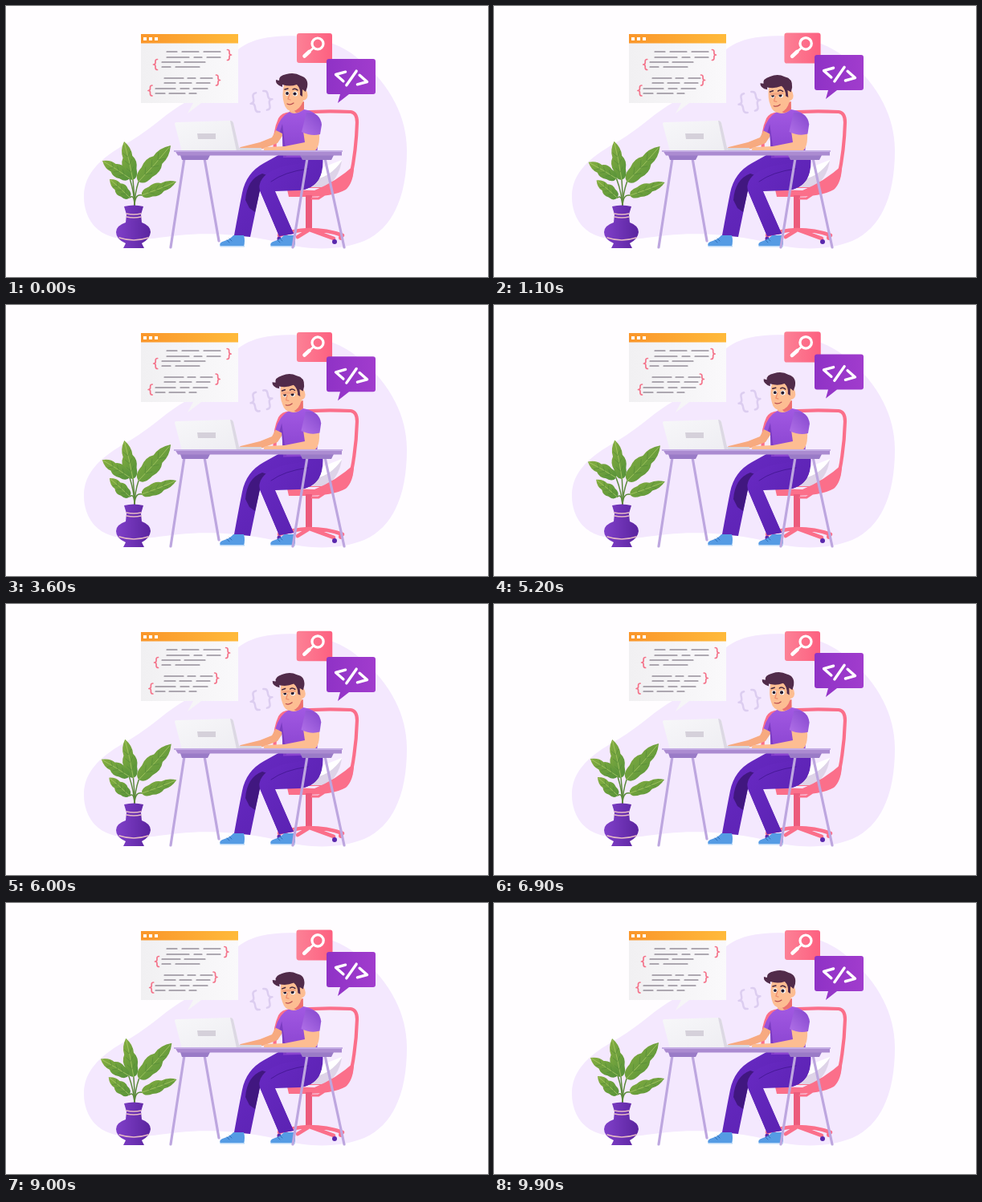
Write an HTML page that moves like this. It is 600 px wide and 338 px high and loops after 10000 ms.

```html
<!DOCTYPE html>
<html lang="en">
<head>
<meta charset="utf-8">
<title>Coding at a desk</title>
<style>
html, body { margin: 0; width: 100%; height: 100%; overflow: hidden; background: #fffdff; }
svg { display: block; width: 100vw; height: 100vh; }
.line { fill: none; stroke-linecap: round; stroke-linejoin: round; }
</style>
</head>
<body>
<svg viewBox="0 0 600 338" preserveAspectRatio="xMidYMid meet">
<defs>
  <linearGradient id="orange"><stop stop-color="#fa962b"/><stop offset="1" stop-color="#ffba3b"/></linearGradient>
  <linearGradient id="paper"><stop stop-color="#f1f0f2"/><stop offset="1" stop-color="#faf9fb"/></linearGradient>
  <linearGradient id="pink"><stop stop-color="#fc8196"/><stop offset="1" stop-color="#fd6080"/></linearGradient>
  <linearGradient id="violet"><stop stop-color="#8f32c6"/><stop offset="1" stop-color="#a13ccd"/></linearGradient>
  <linearGradient id="shirt" x1="0" y1="0" x2="0" y2="1"><stop stop-color="#a259e2"/><stop offset="1" stop-color="#8842cf"/></linearGradient>
  <linearGradient id="sleeve" x1="1" y1="0" x2="0" y2="1"><stop stop-color="#8446cd"/><stop offset="1" stop-color="#b171e8"/></linearGradient>
  <linearGradient id="green" x1="0" y1="0" x2="1" y2="1"><stop stop-color="#86ae40"/><stop offset="1" stop-color="#55913a"/></linearGradient>
  <linearGradient id="pot"><stop stop-color="#8040c9"/><stop offset="1" stop-color="#5b249f"/></linearGradient>
  <linearGradient id="pants" x1="0" y1="0" x2="1" y2="1"><stop stop-color="#692ac4"/><stop offset="1" stop-color="#5720ad"/></linearGradient>
  <linearGradient id="lid" x1="0" y1="0" x2="1" y2="1"><stop stop-color="#f7f7f9"/><stop offset="1" stop-color="#eeedf2"/></linearGradient>
</defs>

<path fill="#f4e8fe" d="M97 240C96 209 118 190 149 172C181 154 196 136 222 121C260 100 270 52 317 41C359 32 408 39 439 66C480 99 499 140 499 180C499 230 486 275 446 293C413 306 376 304 345 296C300 285 255 282 215 286C180 290 163 294 137 289C111 284 98 264 97 240Z"/>

<!-- code window -->
<path fill="url(#paper)" d="M168 46H289V121H243L226 134L233 121H168Z"/>
<path fill="url(#orange)" d="M168 35H289V46.500H168Z"/>
<path fill="#fff" d="M171 39h4v4h-4zM178 39h4v4h-4zM185 39h4v4h-4z"/>
<g id="rows" class="line" stroke="#665c6c" stroke-width="1.1"></g>
<g id="braces" class="line" stroke="#f4748b" stroke-width="1.7"></g>
<g id="floating" class="line" stroke="#dccdf0" stroke-width="2.500"></g>

<!-- speech bubbles -->
<g id="search">
  <path fill="url(#pink)" d="M365 34H403Q406 34 406 37V73L398 71H365Q362 71 362 68V37Q362 34 365 34Z"/>
  <g class="line" stroke="#fff"><circle cx="388" cy="47" r="7" stroke-width="3.2"/><path d="M383 52L378 56.500" stroke-width="2.6"/><path d="M377.500 57L371.500 62.500" stroke-width="4.6"/></g>
</g>
<g id="code">
  <path fill="url(#violet)" d="M402 66H457Q460 66 460 69V107Q460 110 457 110H427L413 121L416 110H402Q399 110 399 107V69Q399 66 402 66Z"/>
  <path class="line" stroke="#fff" stroke-width="3.4" transform="rotate(13 430 90)" d="M421 84L410 90L421 96M434 80L426 100M439 84L450 90L439 96"/>
</g>

<!-- chair -->
<path fill="#f6ebfe" stroke="#fb6f8a" stroke-width="4.200" stroke-linejoin="round" d="M335 184Q333 158 341 141Q344 135 354 134Q390 130 429 132Q437 133 437 145Q436 180 429 213L422 225H359"/>
<path fill="#fff" d="M385 205L418 192Q414 215 397 225H371Z"/>
<path fill="#ded3e8" d="M385 216Q404 213 418 193Q414 217 397 226H375Z"/>
<path fill="#fb6f8a" d="M350 229L384 230Q411 219 433 199Q433 220 423 229Q407 238 372 238H352Z"/>
<path fill="#ec5b7c" d="M373 236H381V281H373Z"/>
<path class="line" stroke="#fb6f8a" stroke-width="3" d="M381 240H389L395 236"/>
<path class="line" stroke="#fb6f8a" stroke-width="4.600" d="M377 279Q357 280 340 286M377 279Q400 279 419 286M378 279L408 290M376 280L363 288"/>
<g fill="#5a28ad"><circle cx="409" cy="294" r="3"/><circle cx="340" cy="290" r="2.500"/></g>
<circle cx="417" cy="289" r="3" fill="#fb6f8a"/>

<!-- legs and shoes -->
<path fill="url(#pants)" d="M339 186H394Q396 205 389 217Q381 229 364 230L335 231L358 284L340 287L316 230L304 288L284 286Q290 253 294 233Q299 208 321 196Z"/>
<path fill="#411780" d="M319 209Q300 216 298 242L303 252L310 257L316 230Q315 219 325 211Z"/>
<path fill="url(#pants)" d="M345 200Q319 208 316 222Q314 227 318 235L340 287L358 284L334 230L364 230Q388 228 393 206L391 192Z"/>
<path class="line" stroke="#481998" stroke-width="1" d="M376 203Q346 207 330 219"/>
<g id="shoes"></g>

<!-- body -->
<path fill="#f7aa80" d="M337 153L346 159L338 171L320 178L293 181Q287 179 292 176L316 170L331 164Z"/>
<g id="torso">
  <path fill="#fab58c" d="M353 119H371V136Q362 141 353 135Z"/>
  <path fill="#ed7170" d="M357 128L371 119V129Q366 133 361 133Z"/>
  <path fill="url(#shirt)" d="M353 132Q360 137 371 129Q386 131 390 142L387 189H345L344 159L336 155Q341 138 353 132Z"/>
  <path fill="#7b3cc2" d="M344 147L349 188H345L344 159L341 157Z"/>
  <g id="head">
    <path fill="#fdbd92" d="M346 98Q343 112 346 121Q348 131 357 131Q366 130 370 118Q377 116 375 108Q374 103 370 105L368 95Z"/>
    <path fill="#512b4a" d="M344 101Q335 98 336 92L340 93Q339 87 349 85Q359 82 367 87Q377 90 375 101L373 107L369 104V113L366 111Q367 103 362 98Q353 101 344 98Z"/>
    <path class="line" stroke="#43263e" stroke-width="1.500" d="M347 104L351 103M357 104Q360 102 363 105"/>
    <g fill="#fff"><ellipse cx="350" cy="109" rx="2.500" ry="3"/><ellipse cx="360" cy="109.500" rx="3" ry="3"/></g>
    <g fill="#261c30"><circle cx="350" cy="109" r="1.900"/><circle cx="359.500" cy="109.500" r="2.100"/></g>
    <path id="lids" fill="#f3a681" d="M346.500 105.500H363.500V109H346.500Z"/>
    <path class="line" stroke="#ee8e70" stroke-width="1.300" d="M353 110L351 116L354 117"/>
    <path class="line" stroke="#b84d50" stroke-width="1.200" d="M350 122Q354 124 358 121"/>
  </g>
</g>

<!-- laptop, near arm and desk -->
<path fill="#d9d7e0" d="M285 177H318V181H285Z"/>
<path fill="url(#lid)" d="M212 145L279 143Q282 143 283 146L291 181H219L210 147Q210 145 212 145Z"/>
<path fill="#dcd8e3" d="M279 143Q282 143 283 146L291 181H287Z"/>
<path fill="#d5d0da" d="M238 159H261V166H239Z"/>
<path fill="#fdbd92" d="M370 156L390 158Q391 176 384 181H324Q318 180 323 176L347 175L372 170Z"/>
<path id="nearSleeve" fill="url(#sleeve)" d="M374 133Q391 132 393 148L391 160Q380 163 368 157Z"/>
<path class="line" stroke="#bda6df" stroke-width="3.200" d="M222 190L205 301M247 190L265 293M375 190L357 301M397 190L421 301"/>
<path fill="#9a7bc7" d="M217 186H254L251 192H219ZM366 186H408L405 192H369Z"/>
<path fill="#ab8bd1" d="M210 180H418V186.500H214Z"/>
<path fill="#c4ade4" d="M209 180H419V182H209Z"/>

<!-- plant -->
<g id="leaves"></g>
<path fill="url(#pot)" d="M147 250Q159 247 171 250L168 260L169 270Q180 274 180 282Q179 291 169 296L172 302H146L149 296Q137 291 137 282Q137 274 149 270L150 260Z"/>
<path class="line" stroke="#e6bac4" stroke-width="1.400" d="M150 259Q159 261 168 259M150 263Q159 265 168 263M141 289Q159 295 177 289"/>
</svg>

<script>
const svgNS = "http://www.w3.org/2000/svg";
const byId = id => document.getElementById(id);
const LOOP = 10000, STEP = 100;

function add(parent, tag, attrs) {
  const node = document.createElementNS(svgNS, tag);
  for (const key in attrs) node.setAttribute(key, attrs[key]);
  return parent.appendChild(node);
}

// A curly brace centred on the origin; side is 1 for "{" and -1 for "}".
function bracePath(side, w, h) {
  const x = side * w / 2, y = h / 2;
  return `M${x} ${-y}Q0 ${-y} 0 ${-y * .65}V${-y * .35}Q0 0 ${-x} 0Q0 0 0 ${y * .35}V${y * .65}Q0 ${y} ${x} ${y}`;
}

const rows = [
  [57, "M200 0H213M219 0H240M246 0H267"],
  [64, "M200 0H228M234 0H244M250 0H267"],
  [70, "M194 0H217M222 0H248"],
  [76, "M194 0H205M211 0H241"],
  [90, "M197 0H221M226 0H236M242 0H257"],
  [96, "M197 0H211M216 0H231M237 0H254"],
  [103, "M186 0H211M217 0H228M233 0H251"],
  [109, "M186 0H198M203 0H223M228 0H237"]
];
for (const [y, d] of rows) add(byId("rows"), "path", { d, transform: `translate(0 ${y})` });

// x, y, side, horizontal travel
const braces = [[278, 61, -1, -5.5], [186, 73, 1, 3], [264, 92.5, -1, -5.3], [179.5, 105.5, 1, 2.6]]
  .map(([x, y, side, travel]) => ({
    x, y, travel,
    node: add(byId("braces"), "path", { d: bracePath(side, 5, 13) })
  }));

add(byId("floating"), "path", { d: bracePath(1, 9, 24), transform: "translate(309 121) rotate(-11)" });
add(byId("floating"), "path", { d: bracePath(-1, 9, 24), transform: "translate(327 117) rotate(-11)" });

for (const x of [266, 329]) {
  const shoe = add(byId("shoes"), "g", { transform: `translate(${x} 286)` });
  add(shoe, "path", { fill: "#559be4", d: "M17 0H30Q32 7 30 14H1Q-2 9 6 7Q13 5 17 0Z" });
  add(shoe, "path", { fill: "#b7d7f7", d: "M0 13H31V14.5H1Z" });
  add(shoe, "path", { class: "line", stroke: "#2f6fb8", "stroke-width": 1, d: "M9 6L12 9M12 4L15 7" });
}

// Leaf base, tip, width and sway in degrees; all stems share one root.
const root = [160, 250];
const leaves = [
  [158, 217, 147, 169, 15, 2.4],
  [165, 219, 205, 174, 18, 1.6],
  [154, 215, 120, 193, 14, -3.4],
  [154, 239, 129, 216, 13, -3.4],
  [169, 236, 212, 219, 13, 1.5]
].map(([bx, by, tx, ty, width, sway]) => {
  const node = add(byId("leaves"), "g", {});
  const dx = tx - bx, dy = ty - by, length = Math.hypot(dx, dy);
  const nx = -dy / length * width, ny = dx / length * width;
  const at = (along, across) => `${bx + dx * along + nx * across} ${by + dy * along + ny * across}`;
  const edge = side => `Q${at(.02, .5 * side)} ${at(.26, .5 * side)}Q${at(.45, .75 * side)} ${at(.6, .4 * side)}Q${at(.8, .5 * side)} ${at(1, 0)}`;
  add(node, "path", { class: "line", stroke: "#5c8a3b", "stroke-width": 1.5, d: `M${root}Q${root[0]} 234 ${bx} ${by}` });
  add(node, "path", { fill: "url(#green)", d: `M${at(0, 0)}${edge(1)}M${at(0, 0)}${edge(-1)}` });
  add(node, "path", { class: "line", stroke: "#a9c866", "stroke-width": .8, d: `M${at(0, 0)}Q${at(.5, .08)} ${at(.95, 0)}` });
  for (const along of [.2, .4, .6]) {
    add(node, "path", { class: "line", stroke: "#4c8237", "stroke-width": .5, d: `M${at(along + .12, .3)}L${at(along, 0)}L${at(along + .12, -.3)}` });
  }
  return { node, sway };
});

function place(node, transform) { node.setAttribute("transform", transform); }

function draw(time) {
  const t = Math.floor(time % LOOP / STEP) * STEP;
  const wave = cycles => (1 - Math.cos(2 * Math.PI * cycles * t / LOOP)) / 2;
  const sway = wave(3), nod = wave(4), bob = wave(5);

  for (const b of braces) place(b.node, `translate(${b.x + b.travel * sway} ${b.y})`);
  for (const leaf of leaves) place(leaf.node, `rotate(${leaf.sway * sway} ${root})`);
  place(byId("search"), `translate(384 53) scale(${1 + .035 * sway}) translate(-384 -53)`);
  place(byId("code"), `translate(0 ${-5 * bob})`);
  place(byId("floating"), `translate(0 ${bob})`);

  const lean = `rotate(${-1.2 * nod} 365 186)`;
  place(byId("torso"), lean);
  place(byId("nearSleeve"), lean);
  place(byId("head"), `translate(0 ${1.5 * nod}) rotate(${-4.5 * nod} 362 129)`);
  place(byId("lids"), `translate(0 105.5) scale(1 ${nod * nod}) translate(0 -105.5)`);
}

function tick() {
  draw(performance.now());
  requestAnimationFrame(tick);
}
tick();
</script>
</body>
</html>
```
